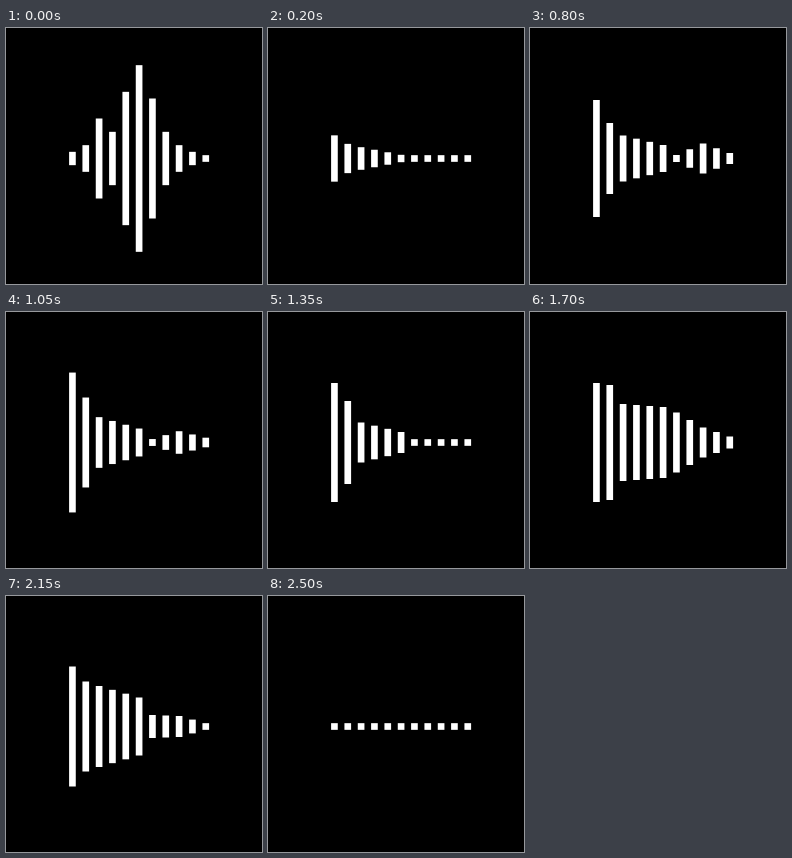
Recreate the animation shown at these times as an HTML page. Size 256 px wide and 256 px high, loop 2.55 s.

```html
<!DOCTYPE html>
<html lang="en">
<head>
<meta charset="utf-8">
<title>Sound bars</title>
<style>
  html, body { margin: 0; width: 100%; height: 100%; overflow: hidden; background: #000; }
  svg { display: block; width: 100%; height: 100%; }
  g { filter: blur(.4px); }
</style>
</head>
<body>
<svg viewBox="0 0 256 256"><g fill="#fff"></g></svg>
<script>
const LOOP = 2550, STEP = 50, ICON_TIME = 100;
const UNIT = 40 / 3, SIZE = UNIT / 2, LEFT = 63.1, MIDDLE = 130.5;
const SWELL = 0.2;

// Icon heights in grid units.
const icon = [1, 2, 6, 4, 10, 14, 9, 4, 2, 1, 0.5];

// Spectrum outline: levels at a few bands, joined by straight lines.
const bands = [0, 1, 2, 5, 6, 8, 10];
const moments = [
  { at: 100, levels: [] },
  { at: 400, levels: [137, 81, 59, 9] },
  { at: 800, levels: [117, 71, 46, 27, 7, 30, 11] },
  { at: 1350, levels: [119, 83, 40, 21] },
  { at: 1700, levels: [119, 115, 77, 71, 60, 30, 12] },
  { at: 2150, levels: [120, 90, 81, 58, 23, 21] },
  { at: 2500, levels: [] }
];

const group = document.querySelector("g");
const bars = icon.map((_, i) => {
  const bar = document.createElementNS("http://www.w3.org/2000/svg", "rect");
  bar.setAttribute("x", LEFT + i * UNIT);
  bar.setAttribute("width", SIZE);
  return group.appendChild(bar);
});

const mix = (a, b, p) => a + (b - a) * p;
const smooth = p => p * p * (3 - 2 * p);

function outline(levels, i) {
  const k = Math.max(1, bands.findIndex(band => band >= i));
  const p = (i - bands[k - 1]) / (bands[k] - bands[k - 1]);
  return mix(levels[k - 1] ?? SIZE, levels[k] ?? SIZE, p);
}

// Bars ease from one outline to the next and swell on the way.
function heightAt(time, i) {
  if (time < ICON_TIME) return icon[i] * UNIT;
  const next = moments.findIndex(({ at }) => at >= time && at > ICON_TIME);
  const from = moments[next - 1], to = moments[next];
  const p = (time - from.at) / (to.at - from.at);
  const h = mix(outline(from.levels, i), outline(to.levels, i), smooth(p));
  return h + (h - SIZE) * SWELL * Math.sin(Math.PI * p);
}

function draw() {
  const time = Math.floor(performance.now() % LOOP / STEP) * STEP;
  bars.forEach((bar, i) => {
    const h = heightAt(time, i);
    bar.setAttribute("y", MIDDLE - h / 2);
    bar.setAttribute("height", h);
  });
  requestAnimationFrame(draw);
}
draw();
</script>
</body>
</html>
```
